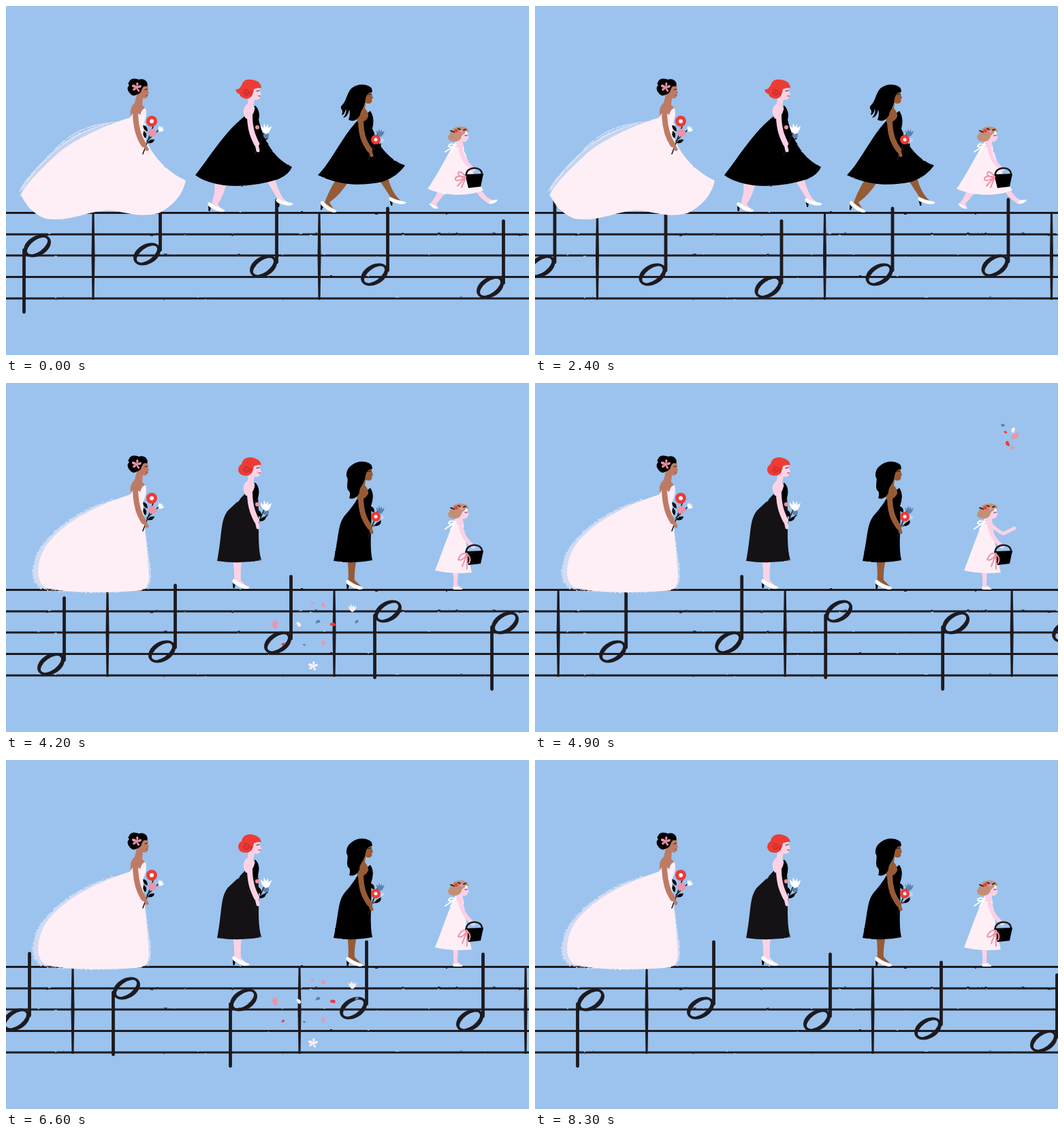
Write an HTML page that moves like this. It is 768 px wide and 512 px high and loops after 8.4 s.

```html
<!DOCTYPE html>
<html lang="en">
<head>
<meta charset="utf-8">
<title>Bridal march</title>
<style>
  html, body { margin: 0; width: 100%; height: 100%; overflow: hidden; background: #9bc3ee; }
  svg { display: block; width: 100%; height: 100%; }
  .line { fill: none; stroke-linecap: round; stroke-linejoin: round; }
  .ink { stroke: #1d1a1f; }
  .white { fill: #feeff6; }
  .black { fill: #000; }
  .pink { fill: #fbd2e5; }
  .brown { fill: #965b35; }
  .tan { fill: #bd7b65; }
  .red { fill: #ee3b34; }
  .rose { fill: #ee93a8; }
  .blue { fill: #5d82ae; }
  .streaks { stroke: #feeff6; stroke-width: 1.6; stroke-dasharray: 50 3 30 5; opacity: .6; }
</style>
</head>
<body>
<svg viewBox="0 0 768 512">
  <defs>
    <filter id="rough" filterUnits="userSpaceOnUse" x="0" y="0" width="768" height="512" color-interpolation-filters="sRGB">
      <feTurbulence type="fractalNoise" baseFrequency=".1" numOctaves="2" seed="4"/>
      <feDisplacementMap in="SourceGraphic" scale="1.8" xChannelSelector="R" yChannelSelector="G"/>
    </filter>
    <filter id="brush" filterUnits="userSpaceOnUse" x="0" y="0" width="768" height="512" color-interpolation-filters="sRGB">
      <feTurbulence type="fractalNoise" baseFrequency=".3 .5" numOctaves="2" seed="9"/>
      <feDisplacementMap in="SourceGraphic" scale="8" xChannelSelector="R" yChannelSelector="G"/>
    </filter>
    <g id="shoe">
      <path class="black" d="M1 4L1.500 12H3.500L5 6Z"/>
      <path fill="#fff" d="M0 1Q2-3 5 0L11 4Q20 8 25 10Q26 13 20 13Q10 11 6 7Q2 7 0 1Z"/>
    </g>
    <path id="leaf" d="M0 0Q1-7 9-7Q8 0 0 0Z"/>
    <path id="tulip" d="M0 8Q-7 3-7-5L-3-1L-2-8L1-2L4-7L4-1L9-4Q7 7 0 8Z"/>
    <path id="blossom" d="M0-1Q-2-7 1-7Q4-5 1-1Q7-5 7-1Q6 2 1 1Q6 6 3 7Q0 6 0 2Q-4 7-6 4Q-6 1-1 1Q-8 1-7-3Q-4-5 0-1Z"/>
    <path id="drop" d="M0-5Q4-5 3 0L2 5Q-2 6-3 1Q-4-3 0-5Z"/>
  </defs>

  <rect width="768" height="512" fill="#9bc3ee"/>
  <path id="staff" class="line ink" stroke-width="2.800" filter="url(#rough)"/>
  <g id="score"></g>

  <!-- bride -->
  <g>
    <g class="wide white">
      <path opacity=".4" filter="url(#brush)" d="M165 172C130 173 98 188 76 209C45 235 24 260 21 277Q35 303 60 311L150 295Z"/>
      <path class="line streaks" d="M168 170C125 172 98 184 72 210M150 173C115 180 80 202 58 225C40 243 26 258 20 272M110 186C75 205 45 235 24 268"/>
      <path filter="url(#rough)" d="M181 164C150 174 108 191 80 213C52 238 30 260 22 277Q34 303 58 312C95 317 115 302 148 300C175 300 190 312 224 304C246 293 260 276 264 256C240 245 216 223 205 195V172Z"/>
    </g>
    <g class="stand white">
      <path opacity=".55" filter="url(#brush)" d="M160 170C120 180 65 212 46 249C36 270 36 294 51 301C80 309 165 309 205 302C214 296 213 280 211 262L202 200Z"/>
      <path filter="url(#rough)" d="M181 164C145 176 85 200 58 240C44 264 43 291 58 300C90 309 160 308 200 304C211 300 211 285 208 262C207 232 202 205 201 172Z"/>
    </g>
    <path class="tan" d="M192 116L206 112Q210 118 208 122L210 128L208 130L208 133Q206 137 201 135L200 145Q206 150 205 158L184 164Q180 150 189 142L192 130Z"/>
    <path class="white" d="M179 167Q186 160 188 152L197 160Q200 149 205 150Q208 160 202 173L199 185H185Z"/>
    <path class="black" d="M181 111C184 104 193 107 195 108C204 105 210 113 207 118Q202 116 200 121Q198 129 192 130Q186 134 181 127Q176 121 181 116Q178 114 181 111Z"/>
    <use href="#blossom" x="192" y="119" class="rose"/>
    <path class="line ink" d="M204 123L208 122"/>
    <path class="line" stroke="#c23b3e" stroke-width="1.500" d="M206 131H208"/>
    <path class="line ink" stroke-width="1.600" d="M201 217L217 174M207 198L226 180"/>
    <use href="#leaf" x="208" y="201" class="black" transform="rotate(12 208 201)"/>
    <use href="#leaf" x="208" y="184" class="black" transform="rotate(-88 208 184)"/>
    <use href="#leaf" x="205" y="194" class="black" transform="rotate(-65 205 194)"/>
    <circle cx="215" cy="186" r="6" class="rose"/>
    <circle cx="214" cy="169" r="8" class="red"/><circle cx="214" cy="169" r="3" fill="#fff"/>
    <use href="#tulip" fill="#fff" transform="translate(227 180) scale(.6) rotate(35)"/>
    <path class="line" stroke="#bd7b65" stroke-width="8" d="M190 154C190 176 194 191 202 203"/>
    <path class="line" stroke="#bd7b65" stroke-width="5" d="M201 200L207 210"/>
  </g>

  <!-- red-haired bridesmaid -->
  <g>
    <g class="wide">
      <path class="pink" d="M307 255H325Q320 278 311 291L318 299L303 296Q302 286 306 275ZM380 252L394 250Q399 270 407 282L416 290L403 290Z"/>
      <use href="#shoe" x="296" y="289"/>
      <use href="#shoe" transform="translate(396 284) rotate(-10) scale(.95)"/>
      <path class="black" filter="url(#rough)" d="M366 146Q374 154 371 167C379 201 397 226 420 236Q416 247 400 254Q360 267 320 263Q292 259 278 248C297 225 322 182 353 160Z"/>
    </g>
    <g class="stand">
      <path class="pink" d="M333 258H346Q344 279 345 290L353 298L335 295Q336 276 333 258Z"/>
      <use href="#shoe" x="332" y="289"/>
      <path fill="#141215" filter="url(#rough)" d="M366 146Q374 154 370 167C373 205 368 235 375 260Q343 266 310 261C318 222 314 202 326 187Q340 175 353 160Z"/>
    </g>
    <path class="pink" d="M358 119L372 117L373 125L375 130L373 132V135Q370 139 365 137L363 146Q371 156 364 168L352 165Q344 151 355 143Z"/>
    <path class="black" d="M366 147Q374 155 370 169L360 178L355 160Q363 166 366 147Z"/>
    <path class="red wide" d="M346 116Q349 106 360 108Q374 109 375 120Q368 120 364 122Q362 137 352 136Q343 134 343 129Q338 128 337 122Q342 124 346 116Z"/>
    <path class="red stand" d="M346 119Q348 108 360 109Q373 111 375 120Q368 120 364 122Q362 137 351 136Q342 135 341 128Q341 122 346 119Z"/>
    <path class="line" stroke="#a92427" d="M350 123Q358 122 357 129Q351 134 349 127Q354 124 354 129M360 125V132"/>
    <path class="line ink" d="M368 125L372 124"/>
    <path class="line" stroke="#dd4351" stroke-width="1.500" d="M371 132H373"/>
    <path class="line ink" stroke-width="1.600" d="M365 218L379 186M371 203L384 194"/>
    <use href="#leaf" x="373" y="203" class="black"/>
    <use href="#leaf" x="374" y="197" class="black" transform="rotate(-70 374 197)"/>
    <circle cx="382" cy="190" r="4" class="blue"/>
    <circle cx="369" cy="178" r="3" class="rose"/>
    <use href="#tulip" transform="translate(381 180)" fill="#fff"/>
    <path class="line" stroke="#fbd2e5" stroke-width="8" d="M358 151C357 178 362 190 368 202"/>
    <path class="line" stroke="#fbd2e5" stroke-width="5" d="M367 199L370 212"/>
  </g>

  <!-- long-haired bridesmaid -->
  <g>
    <g class="wide">
      <path class="brown" d="M484 255L504 256Q490 278 475 288L481 298L466 294Q472 275 484 255ZM546 252L560 248Q565 270 575 281L581 287L569 287Z"/>
      <use href="#shoe" transform="translate(462 287) rotate(8)"/>
      <use href="#shoe" transform="translate(562 282) rotate(-10) scale(.95)"/>
      <path class="black" filter="url(#rough)" d="M535 154Q542 164 538 180C546 206 564 226 586 234Q574 251 552 258Q500 269 458 248C477 230 493 192 518 166Z"/>
    </g>
    <g class="stand">
      <path class="brown" d="M501 258H515Q511 278 512 289L521 298L502 294Q504 275 501 258Z"/>
      <use href="#shoe" x="499" y="290"/>
      <path class="black" filter="url(#rough)" d="M535 154Q542 164 536 180C538 210 533 238 538 260Q510 266 481 261C489 225 487 208 497 195Q510 181 518 166Z"/>
    </g>
    <path class="brown" d="M523 121L536 121L537 129L539 135L537 137V141Q534 145 528 142L527 150Q535 158 531 171L517 172Q511 158 521 150Z"/>
    <path class="black" d="M534 154Q542 165 535 182L524 186L522 170Q532 169 534 154Z"/>
    <path class="black wide" d="M507 121Q517 113 529 116Q538 118 538 126Q530 126 528 136C526 151 521 152 520 160Q513 172 503 167Q506 159 504 152Q502 163 495 164Q501 157 499 151Q497 160 493 160Q495 154 493 152Q490 148 494 145C500 139 500 129 507 121Z"/>
    <path class="black stand" d="M507 121Q517 113 529 116Q538 118 538 126Q530 126 528 136C526 150 519 151 519 161Q514 172 504 169Q507 160 502 157C499 149 504 142 500 137Q499 127 507 121Z"/>
    <path class="line ink" d="M531 130L536 129"/>
    <path class="line" stroke="#bc4036" stroke-width="1.500" d="M534 139H537"/>
    <path class="line ink" stroke-width="1.600" d="M532 226L546 187M540 210L550 202"/>
    <use href="#leaf" x="542" y="210" class="black"/>
    <use href="#leaf" x="541" y="190" class="black" transform="rotate(-85 541 190)"/>
    <use href="#tulip" class="blue" transform="translate(549 186) scale(.75)"/>
    <circle cx="552" cy="197" r="3" fill="#b9d8f3"/>
    <circle cx="543" cy="196" r="7" class="red"/><circle cx="543" cy="196" r="2.500" fill="#fff"/>
    <path class="line" stroke="#965b35" stroke-width="8" d="M521 166C521 187 525 199 534 211"/>
    <path class="line" stroke="#965b35" stroke-width="5" d="M533 208L537 219"/>
  </g>

  <!-- flower girl -->
  <g>
    <g class="wide">
      <path class="pink" d="M634 272L645 274Q638 284 632 290L635 297L621 291Q628 286 634 272ZM690 272L698 270Q704 280 712 284L722 285Q719 290 709 290Q698 284 690 272Z"/>
      <path fill="#fff" d="M621 290Q628 291 635 297Q628 299 621 290ZM710 286L722 284Q719 291 709 290Z"/>
      <path class="white" filter="url(#rough)" d="M660 199L671 202C675 222 686 250 701 270Q686 277 664 277Q635 276 619 268C634 247 647 220 660 199Z"/>
    </g>
    <g class="stand">
      <path class="pink" d="M656 275H664L663 296L671 302H657Q658 288 656 275Z"/>
      <path fill="#fff" d="M656 299L663 299Q671 300 670 303H657Z"/>
      <path class="white" filter="url(#rough)" d="M660 199L671 202C674 220 676 248 684 278Q657 281 630 275C640 250 649 222 660 199Z"/>
    </g>
    <path class="pink" d="M664 186L678 184L678 190L680 193L678 195Q677 200 671 199L671 207L660 207Z"/>
    <path fill="#c29076" d="M654 183Q661 174 674 178Q680 180 679 185Q672 186 669 191Q668 198 659 199Q649 199 649 192Q651 189 654 183Z"/>
    <path class="line" stroke="#fff" stroke-width="2" d="M661 204Q651 200 650 206Q655 208 660 204L645 214M660 204L653 215"/>
    <circle cx="661" cy="183" r="2.600" class="red"/><circle cx="669" cy="184" r="2.300" class="rose"/>
    <circle cx="676" cy="186" r="2" fill="#fff"/>
    <path class="line ink" stroke-width="1.800" d="M653 183L658 185M664 180L667 181M672 182L675 181"/>
    <path class="line ink" stroke-width=".900" d="M674 190L677 190"/>
    <path id="throwArm" class="line" stroke="#fbd2e5" stroke-width="5" d="M668 206Q678 217 688 221L704 213"/>
    <path class="line" stroke="#fbd2e5" stroke-width="6" d="M667 206C669 224 677 232 686 240"/>
    <path class="line ink" stroke-width="2.600" d="M676 249C674 235 701 233 699 249"/>
    <path class="black" d="M674 247L701 246L697 265L679 267Z"/>
    <path class="line wide" stroke="#ee93a8" stroke-width="2" d="M675 250Q665 239 664 246Q666 252 675 251Q659 247 660 255Q665 258 675 251L663 264M675 252L669 266"/>
    <path class="line stand" stroke="#ee93a8" stroke-width="2" d="M677 250Q668 248 664 259Q670 262 677 251L670 269M677 251L677 273M677 251Q684 257 680 264"/>
  </g>
  <g id="petals"></g>
</svg>
<script>
const FRAME_MS = 100, FRAMES = 84, CYCLE = 12, TUNE_WIDTH = 1332;
const $ = id => document.getElementById(id);

$('staff').setAttribute('d', [303.5, 335, 366, 397.5, 429].map(y => `M-5 ${y}H773`).join(''));

// Each note: x, y, stem direction (-1 up, 1 down).
const notes = [[207, 364, -1], [378, 382, -1], [541, 394, -1], [711, 412.5, -1],
  [874, 394, -1], [1044, 381, -1], [1206, 335, 1], [1378, 352, 1]];
const bars = [128, 460, 794, 1127];

const ellipse = (rx, ry, tilt) => {
  const a = tilt * Math.PI / 180, x = rx * Math.cos(a), y = rx * Math.sin(a);
  return `M${-x} ${-y}A${rx} ${ry} ${tilt} 1 1 ${x} ${y}A${rx} ${ry} ${tilt} 1 1 ${-x} ${-y}Z`;
};
const head = ellipse(21.5, 14.5, -30) + ellipse(17.5, 8.5, -36);

const drawNote = ([x, y, dir]) => `<g transform="translate(${x} ${y})">
  <path fill="#1d1a1f" fill-rule="evenodd" d="${head}"/>
  <path class="line ink" stroke-width="4.800" d="M${-19.5 * dir} ${6 * dir}V${97 * dir}"/></g>`;
const drawBar = x => `<path fill="#1d1a1f" d="M${x - 1.5} 304h3l1 62l-1 65h-3l-1-65Z"/>`;
const tune = notes.map(drawNote).join('') + bars.map(drawBar).join('');
$('score').innerHTML = [-1, 0, 1].map(i =>
  `<g transform="translate(${i * TUNE_WIDTH})">${tune}</g>`).join('');

// Each petal: offset in the drifting cloud, shape, scale, class, and offset in the throw for the first few.
const petals = [
  [-60, -6, 'drop', 1.2, 'rose', 9, 0], [60, -10, 'drop', .6, 'blue', -9, -16],
  [25, -6, 'drop', .8, 'red', -2, 11], [-25, -6, 'drop', .8, 'white', 6, -9],
  [11, 21, 'drop', .7, 'rose', 5, 17], [-48, 23, 'drop', .5, 'red', -5, -6],
  [-5, -37, 'drop', .5, 'rose'], [11, -34, 'drop', .7, 'rose'],
  [53, -30, 'tulip', .75, 'white'], [3, -10, 'drop', .7, 'blue'],
  [-17, 24, 'drop', .4, 'blue'], [-4, 55, 'blossom', 1, 'white']];

// Cloud centre and spread for cycle steps 1 to 8.
const cloud = [[696, 78, .3], [692, 187, .3], [650, 222, .5], [590, 275, .7],
  [522, 320, .9], [455, 360, 1], [432, 392, 1.08], [415, 418, 1.12]];

function drawPetals(step) {
  const state = cloud[step - 1];
  if (!state) return '';
  const [cx, cy, spread] = state, thrown = step < 3;
  return petals.filter(p => !thrown || p.length > 5).map(([x, y, shape, size, color, tx, ty], i) => {
    const px = cx + (thrown ? tx : x * spread), py = cy + (thrown ? ty : y * spread);
    const turn = shape === 'drop' ? i * 47 + (step - 6) * 25 : 0;
    return `<use href="#${shape}" class="${color}" transform="translate(${px} ${py}) rotate(${turn}) scale(${size})"/>`;
  }).join('');
}

// Scroll distance by animation step.
const scrollKeys = [[0, 0], [14, 215], [24, 368.5], [42, 645], [57, 891], [66, 1029], [83, 1296], [84, 1332]];
function scrollAt(frame) {
  const i = scrollKeys.findIndex(k => k[0] > frame);
  const [t0, x0] = scrollKeys[i - 1], [t1, x1] = scrollKeys[i];
  return x0 + (x1 - x0) * (frame - t0) / (t1 - t0);
}

const show = (el, on) => { el.style.display = on ? '' : 'none'; };
const wideParts = document.querySelectorAll('.wide'), standParts = document.querySelectorAll('.stand');
let shown = -1;

function render(now) {
  const frame = Math.floor(now / FRAME_MS) % FRAMES;
  if (frame !== shown) {
    shown = frame;
    const step = frame % CYCLE, wide = step % 4 === 0;
    wideParts.forEach(el => show(el, wide));
    standParts.forEach(el => show(el, !wide));
    show($('throwArm'), step > 0 && step < 4);
    $('score').setAttribute('transform', `translate(${-scrollAt(frame)})`);
    $('petals').innerHTML = drawPetals(step);
  }
  requestAnimationFrame(render);
}
render(performance.now());
</script>
</body>
</html>
```
